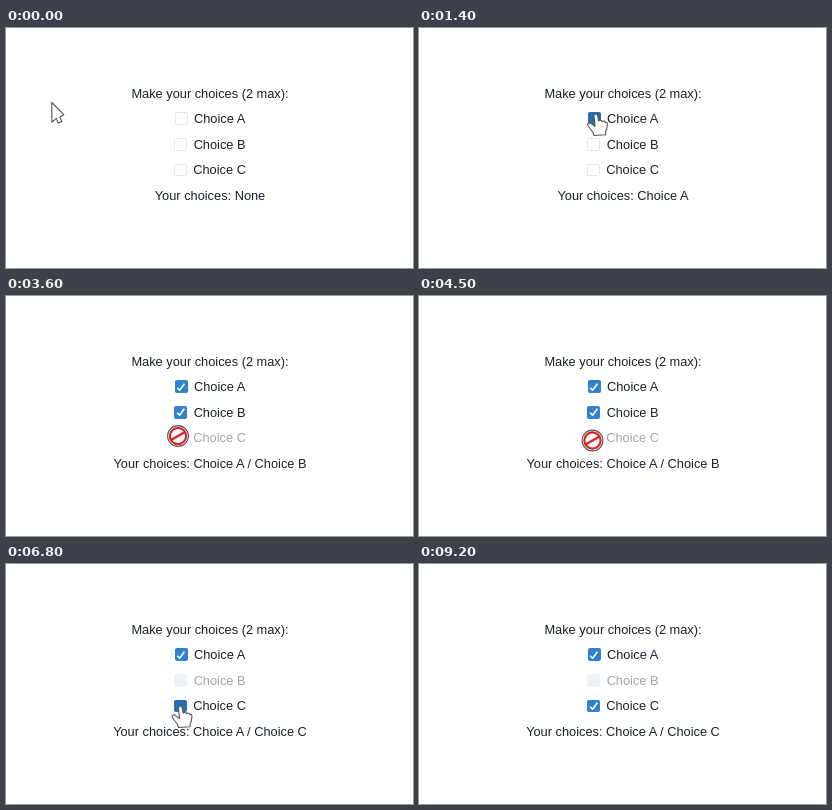
Write an HTML page that moves like this. It is 407x240 px and loops after 9.5 s.

```html
<!DOCTYPE html>
<html lang="en">
<head>
<meta charset="utf-8">
<title>Choices</title>
<style>
html, body { margin: 0; width: 100%; height: 100%; overflow: hidden; background: #fff; }
body { position: relative; font: 12.8px/19.2px "Liberation Sans", Arial, sans-serif; color: #1a202c; }
#form { position: absolute; left: 0; top: 55.6px; width: 408px; }
.row { display: flex; justify-content: center; align-items: center; height: 19.2px; margin-bottom: 6.4px; white-space: pre; }
.box { box-sizing: border-box; width: 12.8px; height: 12.8px; margin-right: 6.4px; border: 1px solid #e2e8f0; border-radius: 1.6px; display: flex; align-items: center; justify-content: center; }
.box svg { width: 9.6px; height: 8px; flex: none; }
.box polyline { fill: none; stroke: #fff; stroke-width: 2; stroke-dasharray: 16; }
.on .box { background: #3182ce; border-color: #3182ce; }
.on.hover .box { background: #2b6cb0; border-color: #2b6cb0; }
.off .box { background: #edf2f7; border-color: #edf2f7; }
.off .label { opacity: .4; }
#cursor { position: absolute; left: 0; top: 0; width: 100%; height: 100%; }
#cursor path, .disc { fill: #fff; stroke: #555; stroke-width: 1.1; stroke-linejoin: round; }
.ban { fill: none; stroke: #dc2228; stroke-width: 2.2; }
</style>
</head>
<body>
<div id="form"></div>
<svg id="cursor">
  <g id="arrow"><path d="M.8 .5V20L5.3 16.6L7.3 21L10.8 19.4L8.8 15.2L12.8 12.7Z"/></g>
  <g id="hand"><path d="M-2 2C-2.4 -.3 1.2 -.6 1.6 1.6L2.6 7C4 5.8 5.6 6.3 6 7.6C7.4 6.4 9 7 9.3 8.6C10.6 8 11.6 9 11.4 10.5L10.8 15L9.6 17.8V20.8L-2 21.5L-3 18.5L-8.2 11.5C-9.2 9.6 -6.6 7.9 -5 9.6L-1 12.4Z"/></g>
  <g id="forbid"><circle class="disc" r="10.4"/><circle class="ban" r="8.1"/><line class="ban" x1="-7" y1="4" x2="7" y2="-4"/></g>
</svg>
<script>
const LOOP = 9500, STEP = 100;
const $ = id => document.getElementById(id);

// Pointer path: time, x, y
const path = [
  [300, 45, 74], [600, 95, 71], [900, 155, 80], [1100, 177, 86], [1600, 177, 86],
  [2000, 178, 115], [2100, 178, 115], [2200, 178.5, 116], [3200, 178.5, 116],
  [3400, 179.5, 130], [3600, 172, 140], [4000, 172, 140], [4200, 178, 147.5],
  [4300, 175, 139], [4400, 171.5, 136.5], [4500, 173.5, 144.5], [5100, 173.5, 144.5],
  [5600, 174.5, 113.5], [5800, 175, 114], [6100, 175, 114], [6400, 174.5, 144],
  [6700, 174.5, 144], [6800, 174.5, 142], [7800, 174.5, 142], [8400, 179, 153],
  [8500, 179, 153], [9100, 31, -8], [9200, 10, -40]
];
// Times at which each choice is ticked and cleared
const choices = [
  { name: 'Choice A', from: 1400, to: LOOP },
  { name: 'Choice B', from: 2900, to: 5800 },
  { name: 'Choice C', from: 6800, to: LOOP }
];

function addRow(html) {
  const row = document.createElement('div');
  row.className = 'row';
  row.innerHTML = html;
  $('form').append(row);
  return row;
}

addRow('Make your choices (2 max):');
for (const c of choices) {
  c.row = addRow('<span class="box"><svg viewBox="0 0 12 10"><polyline points="1.5 6 4.5 9 10.5 1"/></svg></span>' +
    `<span class="label">${c.name}</span>`);
  c.tick = c.row.querySelector('polyline');
}
const summary = addRow('');

function pointerAt(t) {
  const i = path.findIndex(p => p[0] > t);
  if (i === 0) return path[0].slice(1);
  if (i < 0) return path[path.length - 1].slice(1);
  const [a, b] = [path[i - 1], path[i]];
  const k = (t - a[0]) / (b[0] - a[0]);
  return [1, 2].map(j => a[j] + (b[j] - a[j]) * k);
}

function draw(time) {
  const t = Math.floor(time % LOOP / STEP) * STEP;
  const [x, y] = pointerAt(t);
  const isOn = c => t >= c.from && t < c.to;
  const chosen = choices.filter(isOn);
  let shape = 'arrow';

  choices.forEach((c, i) => {
    const on = isOn(c), off = !on && chosen.length === 2;
    const hover = x > 168 && x < 240 && Math.abs(y - 90.8 - 25.6 * i) < 9.6;
    if (hover) shape = off ? 'forbid' : 'hand';
    c.row.classList.toggle('on', on);
    c.row.classList.toggle('off', off);
    c.row.classList.toggle('hover', hover);
    const drawn = on ? Math.min(1, (t - c.from) / 200) : 0;
    c.tick.style.strokeDashoffset = 16 * (1 - drawn);
    c.tick.style.opacity = drawn;
  });
  summary.textContent = 'Your choices: ' + (chosen.map(c => c.name).join(' / ') || 'None');

  for (const id of ['arrow', 'hand', 'forbid']) {
    $(id).style.display = id === shape ? '' : 'none';
  }
  $(shape).setAttribute('transform', `translate(${x} ${y})`);
}

const start = performance.now();
function frame() {
  draw(performance.now() - start);
  requestAnimationFrame(frame);
}
frame();
</script>
</body>
</html>
```
